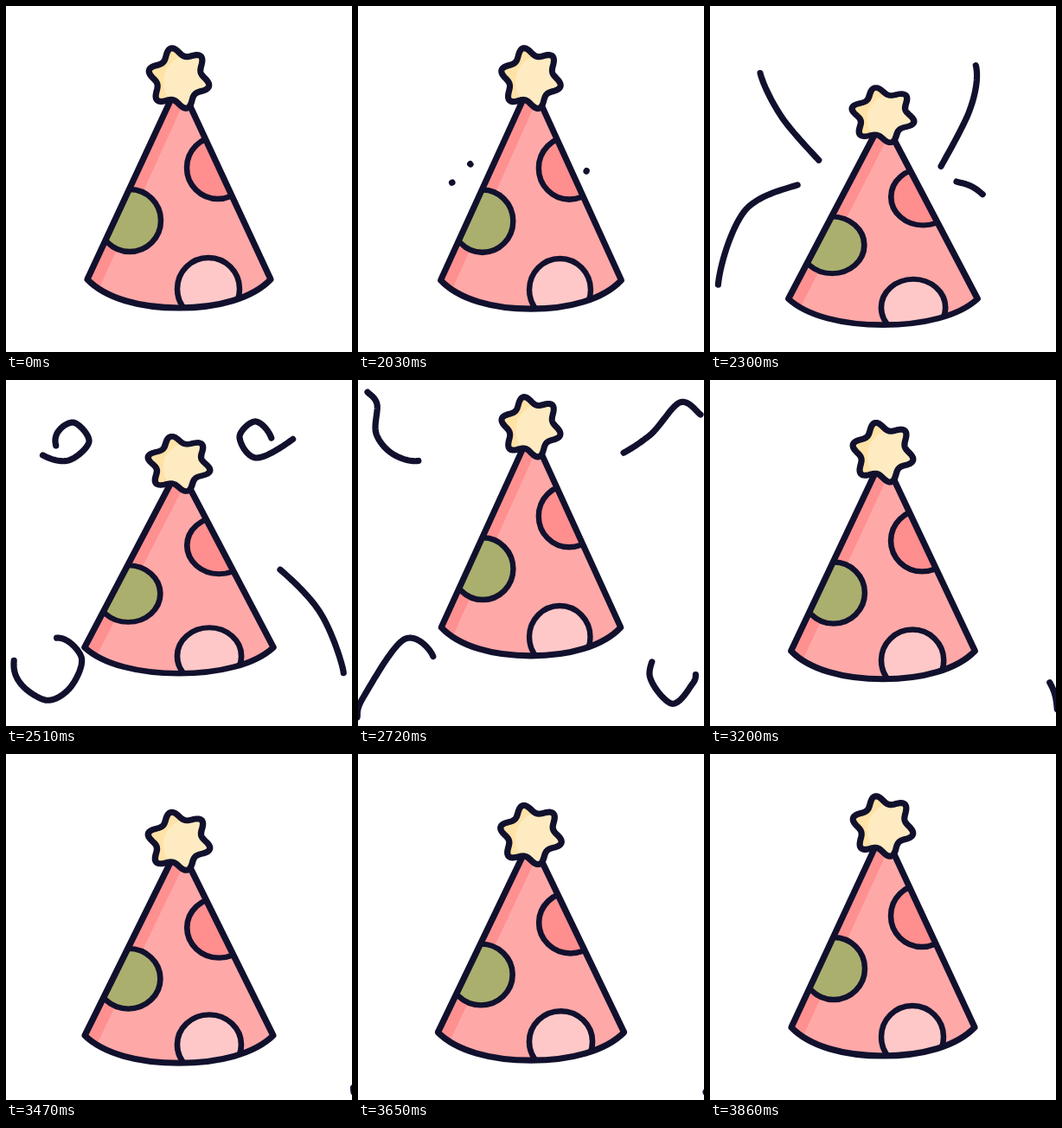
An HTML page with a canvas for the animation above (3.89 s loop, 400 by 400 pixels).

```html
<!DOCTYPE html>
<html>
<head>
<meta charset="utf-8">
<title>Party hat</title>
<style>
  html, body { margin: 0; width: 100%; height: 100%; overflow: hidden; background: #fff; }
  canvas { display: block; width: 100vmin; height: 100vmin; }
</style>
</head>
<body>
<canvas id="stage" width="400" height="400"></canvas>
<script>
const ctx = document.getElementById('stage').getContext('2d');
const LOOP = 3890, START = 2030, STEP = 30, END = 3860;
const INK = '#11112e', THICK = 7.2, THIN = 6.5;

const clamp = u => Math.max(0, Math.min(1, u));
const swing = u => (1 - Math.cos(Math.PI * clamp(u))) / 2;
const settle = (u, power) => 1 - Math.pow(1 - clamp(u), power);

// Squash, jump and land; the scale trails behind the height
const poses = [
  { at: 2030, y: 317, scaleAt: 2030, sx: .985, sy: 1.004 },
  { at: 2260, y: 339.5, scaleAt: 2400, sx: 1.041, sy: .895 },
  { at: 2720, y: 286, scaleAt: 2850, sx: .964, sy: 1.021 },
  { at: 3490, y: 325.5, scaleAt: 3460, sx: 1.028, sy: .966 },
  { at: 3860, y: 316, scaleAt: 3860, sx: 1, sy: 1 }
];

function pose(prop, time, t) {
  const i = Math.max(1, poses.findIndex(p => t <= p[time]));
  const a = poses[i - 1], b = poses[i];
  return a[prop] + (b[prop] - a[prop]) * swing((t - a[time]) / (b[time] - a[time]));
}

// How much of a streamer has been drawn (head) and wiped away (tail)
const quick = {
  start: 2030,
  head: t => { const u = clamp((t - 2030) / 680); return (u + swing(u)) / 2; },
  tail: t => settle((t - 2290) / 820, 1.5)
};
const slow = {
  start: 2258,
  head: t => settle((t - 2258) / 1200, 2.4),
  tail: t => settle((t - 2465) / 1200, 2.4)
};

const streamers = [
  streamer(quick, [[130, 183], [82, 127], [57, 71], [77, 49], [96, 71], [72, 93],
    [41, 86], [21, 62], [22, 28], [11, 14]]),
  streamer(quick, [[264, 191], [300, 121], [308, 72], [289, 48], [270, 66], [290, 90],
    [336, 65], [372, 26], [396, 40]]),
  streamer(quick, [[109, 204], [40, 237], [9, 330], [42, 369], [73, 357], [87, 320],
    [53, 300], [6, 367], [-1, 390]]),
  streamer(slow, [[285, 203], [312, 215], [362, 267], [389, 332], [384, 355], [362, 374],
    [337, 340], [358, 305], [395, 354], [402, 391]])
];

// Smooth curve through the points, with its length
function streamer(trim, pts) {
  const path = new Path2D(), last = pts.length - 1, sub = 24;
  const at = i => pts[Math.max(0, Math.min(last, i))];
  let length = 0, prev = pts[0];
  path.moveTo(...prev);
  for (let k = 1; k <= last * sub; k++) {
    const i = Math.min(last - 1, Math.floor(k / sub)), u = k / sub - i;
    const p = [0, 1].map(c => spline(at(i - 1)[c], at(i)[c], at(i + 1)[c], at(i + 2)[c], u));
    length += Math.hypot(p[0] - prev[0], p[1] - prev[1]);
    path.lineTo(...p);
    prev = p;
  }
  return { trim, path, length };
}

function spline(a, b, c, d, u) {
  return b + u * (c - a + u * (2 * a - 5 * b + 4 * c - d + u * (3 * (b - c) + d - a))) / 2;
}

function drawStreamer({ trim, path, length }, t) {
  const from = trim.tail(t) * length, to = trim.head(t) * length;
  if (t < trim.start || from >= length) return;
  ctx.setLineDash([Math.max(.5, to - from), 2 * length]);
  ctx.lineDashOffset = -from;
  ctx.stroke(path);
}

const cone = new Path2D('M200 88 L94 316 C115 338 155 349 200 349 S285 338 306 316 Z');
const star = new Path2D();
for (let a = 0; a < 360; a += 2) {
  const w = a * Math.PI / 180, wave = 6 * (w - Math.PI / 12);
  const r = 30.4 + 4.9 * Math.cos(wave) + .5 * Math.cos(2 * wave);
  star.lineTo(200 + r * Math.cos(w), 83.5 + r * Math.sin(w));
}
star.closePath();

function disc(x, y, r, color) {
  ctx.beginPath();
  ctx.arc(x, y, r, 0, 7);
  ctx.fillStyle = color;
  ctx.fill();
}

function spot(x, y, color) {
  disc(x, y, 36, color);
  ctx.stroke();
}

function outlined(shape, color, paint) {
  ctx.save();
  ctx.clip(shape);
  ctx.fillStyle = color;
  ctx.fill(shape);
  ctx.lineWidth = THIN;
  paint();
  ctx.restore();
  ctx.stroke(shape);
}

function drawHat() {
  outlined(cone, '#ffa8a8', () => {
    ctx.fillStyle = '#ff9090';
    ctx.fill(new Path2D('M200 88 L213 95 L106 330 L85 330 Z'));
    spot(143, 248, '#aaaf6e');
    spot(245, 187, '#ff8e8e');
    spot(234, 327, '#ffc8c8');
  });
  outlined(star, '#ffe2a6', () => disc(214, 88, 32, '#ffebc1'));
}

function draw(t) {
  const moving = t >= START && t < END;
  const q = START + Math.floor((t - START) / STEP) * STEP;
  ctx.fillStyle = '#fff';
  ctx.fillRect(0, 0, 400, 400);
  ctx.strokeStyle = INK;
  ctx.lineCap = ctx.lineJoin = 'round';
  ctx.lineWidth = THICK;
  ctx.save();
  if (moving) {
    streamers.forEach(s => drawStreamer(s, q));
    ctx.setLineDash([]);
    ctx.translate(200, pose('y', 'at', q));
    ctx.scale(pose('sx', 'scaleAt', q), pose('sy', 'scaleAt', q));
    ctx.translate(-200, -316);
  }
  drawHat();
  ctx.restore();
}

const begin = performance.now();
function tick() {
  draw((performance.now() - begin) % LOOP);
  requestAnimationFrame(tick);
}
tick();
</script>
</body>
</html>
```
